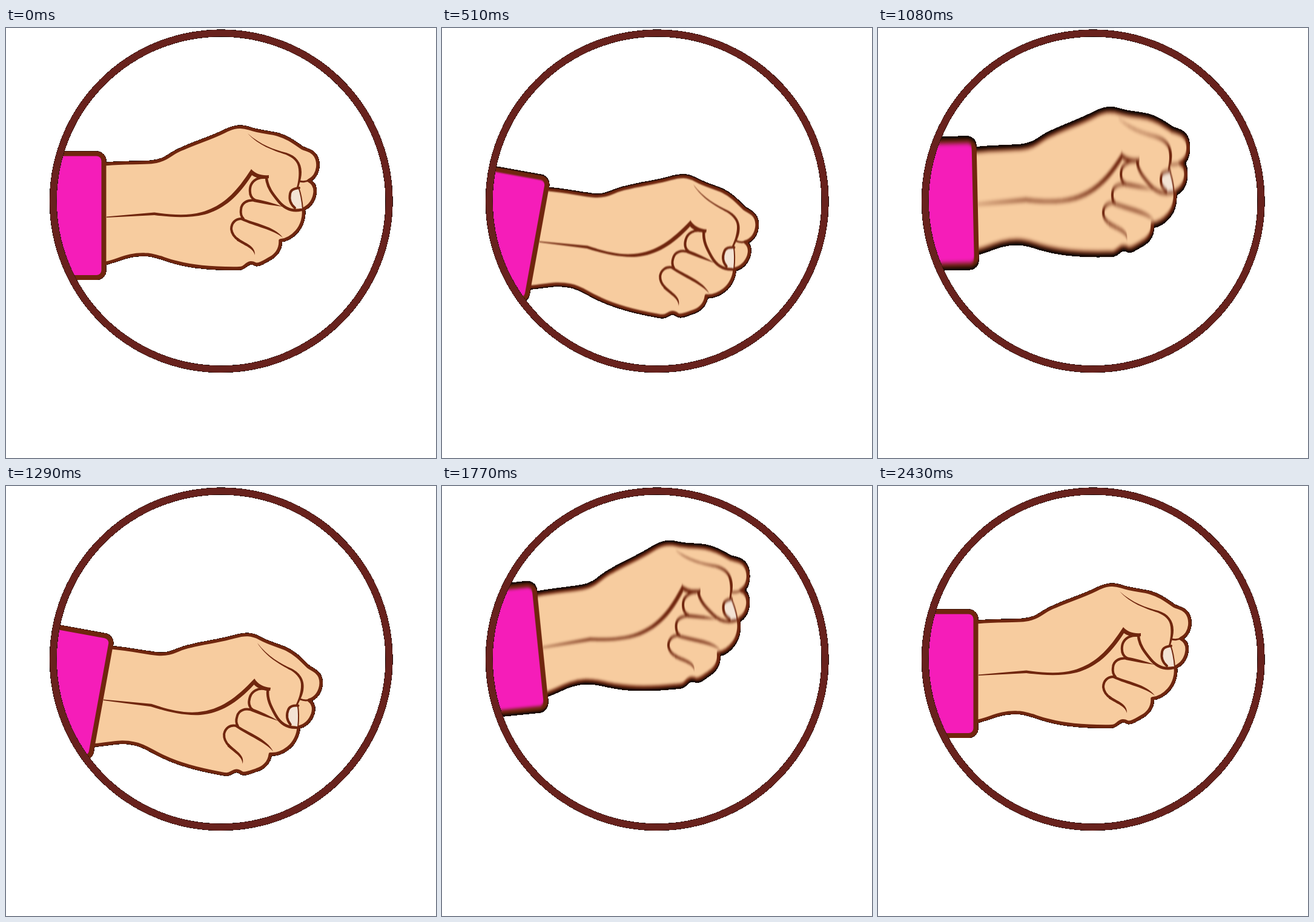
An HTML page for the animation above (2700 ms loop, 710 px wide and 710 px high).

```html
<!DOCTYPE html>
<html lang="en">
<head>
<meta charset="utf-8">
<title>Shaking fist</title>
<style>
  html, body { margin: 0; width: 100%; height: 100%; overflow: hidden; background: #fff; }
  svg { display: block; width: 100%; height: 100%; }
  .line { fill: none; stroke: #70260e; stroke-width: 4; stroke-linecap: round; stroke-linejoin: round; }
  .taper { fill: #70260e; }
</style>
</head>
<body>
<svg viewBox="0 0 710 710">
  <defs>
    <clipPath id="disc"><circle cx="355.2" cy="285.8" r="277"/></clipPath>
    <!-- Vertical blur with a hard black-backed edge -->
    <filter id="smear" filterUnits="userSpaceOnUse" x="0" y="0" width="710" height="710" color-interpolation-filters="sRGB">
      <feGaussianBlur id="blur" stdDeviation="0" result="soft"/>
      <feComponentTransfer in="soft" result="hard">
        <feFuncR type="linear" slope="0"/>
        <feFuncG type="linear" slope="0"/>
        <feFuncB type="linear" slope="0"/>
        <feFuncA type="discrete" tableValues="0 1 1 1 1 1 1 1 1 1"/>
      </feComponentTransfer>
      <feMerge><feMergeNode in="hard"/><feMergeNode in="soft"/></feMerge>
    </filter>
    <filter id="edge" filterUnits="userSpaceOnUse" x="0" y="0" width="710" height="710" color-interpolation-filters="sRGB">
      <feComponentTransfer in="SourceAlpha" result="hard">
        <feFuncA type="discrete" tableValues="0 1 1 1 1 1 1 1"/>
      </feComponentTransfer>
      <feMerge><feMergeNode in="hard"/><feMergeNode in="SourceGraphic"/></feMerge>
    </filter>
  </defs>

  <g clip-path="url(#disc)">
    <g filter="url(#smear)">
      <g id="arm">
        <path class="line" style="fill:#f7cc9f;stroke-width:5.5" d="M150 225 L166 224.5 C195 222 222 223 240 221.5 C266 219 270 207 292 199 C314 189 338 182 360 171 C376 163 387 161 402 166
          C420 172 434 172 449 176 C466 181 477 190 489 198 C498 202 506 203 511 211 C518 223 515 239 507 247 C504 250 502 251 500 252
          C508 256 511 264 510 273 C508 286 502 294 491 299 C493 311 489 326 480 336 C472 345 464 350 453 351
          C454 366 445 376 435 381 C426 386 418 392 412 390 C404 386 401 388 396 392 C389 398 386 397 376 397
          C343 397 307 394 281 387 C260 382 247 374 229 374 C203 373 187 383 166 388 L150 390 Z"/>

        <path class="taper" d="M166 311.5 L245 304.5 C270 308 298 311 323 304 C359 294 381 270 405 233 C412 241 422 244 434 243 L434 248 C423 250 413 248 406 243
          C383 279 360 299 328 308 C299 315 269 312 245 309 L166 313 Z"/>
        <path class="line" style="stroke-width:4.5" d="M430 247 C431 263 441 275 450 286 C459 297 471 304 488 300"/>
        <path class="taper" d="M399 174 C420 193 443 201 463 206 C479 211 488 222 488 238 C488 248 485 255 483 263 L480 263
          C483 252 484 243 483 233 C482 220 473 214 462 209 C441 202 417 194 399 174 Z"/>
        <path class="line" style="stroke-width:3" d="M485 253 Q494 255 501 251"/>

        <path d="M470 270 C473 265 479 265 484 264 C485 275 489 284 489 298 C477 298 471 297 469 286 Z" fill="#f3e3d4"/>
        <path class="line" d="M484 264 C476 265 470 267 469 274 C467 284 471 292 477 297"/>
        <path class="line" style="stroke-width:2" d="M483 263 C487 274 489 286 490 299"/>

        <path class="line" d="M427 247 C413 246 404 255 403 265 C402 274 405 281 411 284"/>
        <path class="taper" d="M410 282 Q433 286 457 295 Q432 292 409 287 Z"/>
        <path class="line" d="M412 285 C398 283 389 289 388 299 C387 306 388 311 392 315"/>
        <path class="taper" d="M389 313 C411 323 443 327 457 346 C441 333 412 328 388 317 Z"/>
        <path class="line" d="M391 315 C378 314 372 323 372 332 C373 341 378 346 384 350"/>
        <path class="taper" d="M382 346 C395 356 412 359 411 375 C408 363 395 360 381 351 Z"/>

        <rect class="line" style="fill:#f51db9;stroke-width:8" x="20" y="207.5" width="141.5" height="204.5" rx="12"/>
      </g>
    </g>
  </g>
  <circle cx="355.2" cy="285.8" r="277.4" fill="none" stroke="#68221d" stroke-width="11.5" filter="url(#edge)"/>
</svg>
<script>
  const LOOP = 2700, STEP = 30, END = 2430;
  const PIVOT = [166, 312];

  // angle, dx, dy
  const REST = [0, 0, 0];
  const UP = [-8.2, 1.8, -58.5];
  const DOWN = [10.3, -5, 41];

  // time, pose, easing power of the move that leads there
  const KEYS = [
    [0, REST, 2],
    [180, [-6.6, 1, -60], 2.3],
    [530, DOWN, 2.6],
    [910, UP, 2.6],
    [1290, DOWN, 2.6],
    [1668, UP, 2.6],
    [2046, DOWN, 2.2],
    [END, REST, 1.75]
  ];

  const arm = document.getElementById('arm');
  const blur = document.getElementById('blur');

  const easeInOut = (x, power) =>
    x < 0.5 ? 0.5 * (2 * x) ** power : 1 - 0.5 * (2 - 2 * x) ** power;

  function draw(time) {
    const t = Math.min(END, Math.floor((time % LOOP) / STEP) * STEP);
    const i = KEYS.findIndex((key, n) => n > 0 && t <= key[0]);
    const [t0, from] = KEYS[i - 1];
    const [t1, to, power] = KEYS[i];
    const x = (t - t0) / (t1 - t0);
    const k = easeInOut(x, power);
    const [angle, dx, dy] = from.map((v, n) => v + (to[n] - v) * k);
    arm.setAttribute('transform', `translate(${dx} ${dy}) rotate(${angle} ${PIVOT})`);

    const speed = 2 * Math.min(x, 1 - x);
    const spread = 3.7 * Math.min(1, 1.15 * speed ** 0.75);
    blur.setAttribute('stdDeviation', `${spread * 0.15} ${spread}`);
  }

  const start = performance.now();
  function tick() {
    draw(performance.now() - start);
    requestAnimationFrame(tick);
  }
  tick();
</script>
</body>
</html>
```
